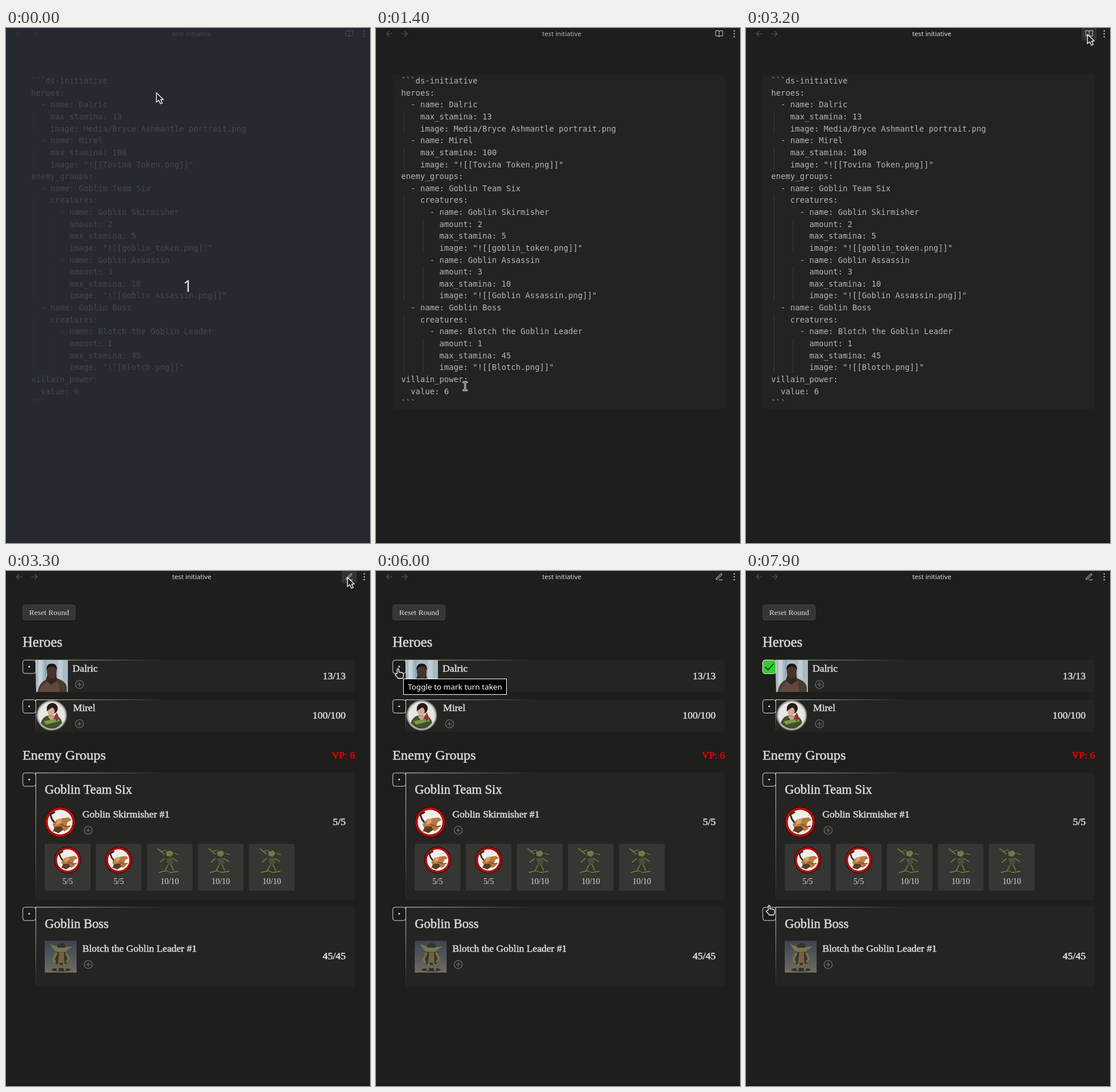
Animation, 629 px wide and 890 px high, one loop 8000 ms. Source, as an HTML page:

```html
<!DOCTYPE html>
<html lang="en">
<head>
<meta charset="utf-8">
<title>test initiative</title>
<style>
html, body { margin: 0; width: 100%; height: 100%; overflow: hidden; background: #1e1e1c; }
svg { display: block; width: 100vw; height: 100vh; }
text { white-space: pre; }
.ui { font-family: "Noto Sans", "Open Sans", sans-serif; }
.code { font: 13.71px "DejaVu Sans Mono", "Liberation Mono", monospace; fill: #b5b5b2; }
.serif { font-family: "Liberation Serif", "Noto Serif", serif; fill: #dadad6; }
.strong { stroke: #dadad6; stroke-width: .55px; }
.line { fill: none; stroke-linecap: round; stroke-linejoin: round; }
</style>
</head>
<body>
<svg id="stage" viewBox="0 0 629 890"></svg>
<script>
const LOOP = 8000, STEP = 100;
const PITCH = 20.63, CODE_TOP = 81;

const code = `\`\`\`ds-initiative
heroes:
  - name: Dalric
    max_stamina: 13
    image: Media/Bryce Ashmantle portrait.png
  - name: Mirel
    max_stamina: 100
    image: "![[Tovina Token.png]]"
enemy_groups:
  - name: Goblin Team Six
    creatures:
      - name: Goblin Skirmisher
        amount: 2
        max_stamina: 5
        image: "![[goblin_token.png]]"
      - name: Goblin Assassin
        amount: 3
        max_stamina: 10
        image: "![[Goblin Assassin.png]]"
  - name: Goblin Boss
    creatures:
      - name: Blotch the Goblin Leader
        amount: 1
        max_stamina: 45
        image: "![[Blotch.png]]"
villain_power:
  value: 6
\`\`\``.split("\n");

// Small drawing helpers
const group = (id, body, attrs = "") => `<g id="${id}" ${attrs}>${body}</g>`;
const rect = (x, y, w, h, fill, more = "") =>
  `<rect x="${x}" y="${y}" width="${w}" height="${h}" fill="${fill}" ${more}/>`;
const circle = (x, y, r, fill, more = "") =>
  `<circle cx="${x}" cy="${y}" r="${r}" fill="${fill}" ${more}/>`;
const shape = (d, fill) => `<path d="${d}" fill="${fill}"/>`;
const line = (d, color, width = 1) =>
  `<path class="line" d="${d}" stroke="${color}" stroke-width="${width}"/>`;
const at = (x, y, body, scale = 1) =>
  `<g transform="translate(${x} ${y}) scale(${scale})">${body}</g>`;
const label = (x, y, size, str, kind = "serif strong", more = "") =>
  `<text x="${x}" y="${y}" font-size="${size}" class="${kind}" ${more}>${str}</text>`;
const END = 'text-anchor="end"', MID = 'text-anchor="middle"';

// Editor view
function guide(x, from, to) {
  const y = i => CODE_TOP + i * PITCH;
  return rect(x, y(from) + 1, 1, y(to + 1) - y(from) - 2, "#3b3b39");
}

function editor() {
  const rows = code.map((row, i) =>
    `<text class="code" x="43.5" y="${(96.1 + i * PITCH).toFixed(1)}">${row}</text>`).join("");
  const guides = [[48, 3, 4], [48, 6, 7], [48, 10, 18], [81, 12, 14],
    [81, 16, 18], [48, 20, 24], [81, 22, 24]].map(g => guide(...g)).join("");
  return rect(28.5, 81, 574, 577.5, "#232322", 'rx="3"') + guides + rows +
    group("chevron", line("M-3.5 -2L0 2L3.5 -2", "#777774", 1.3));
}

// Portraits
const ranger = rect(0, 0, 55, 55, "#a8bbc2") +
  rect(4, 0, 7, 55, "#c4d3d8") + rect(38, 0, 8, 45, "#bccdd2") + rect(15, 0, 3, 40, "#93a8b0") +
  shape("M3 55Q5 38 19 33L34 31Q50 35 53 46V55Z", "#493a32") +
  shape("M6 55Q8 43 19 37L26 43L37 36L41 55Z", "#62493b") +
  shape("M20 24H35L36 35L26 42L17 35Z", "#33251f") +
  `<ellipse cx="27" cy="20" rx="8.5" ry="12" fill="#49332a"/>` +
  shape("M18 18Q17 6 27 6Q37 6 36 18Q33 11 27 11Q21 11 18 18Z", "#181513");

const lady = circle(0, 0, 26.5, "#71716f") + circle(0, 0, 25, "#b9b9b7") + circle(0, 0, 23, "#e8e7e3") +
  shape("M-19 13Q-15 1 -5 0L8 1Q16 3 18 13Q9 24 0 23Q-11 23 -19 13Z", "#3b5429") +
  shape("M-7 1L6 1L0 11Z", "#d0a089") + shape("M-14 10L12 5L14 10L-10 16Z", "#82974b") +
  circle(1, -12, 9.5, "#241c1b") +
  `<ellipse cx="-1" cy="-7" rx="6" ry="8" fill="#d8aa94"/>` +
  shape("M-9 -7Q-7 -22 6 -18L9 -8L1 -14Z", "#241c1b") + shape("M9 -5L13 5L8 11L5 1Z", "#9b3030");

const skirmisher = circle(0, 0, 27, "#4b0706") + circle(0, 0, 25.3, "#c40d0b") +
  circle(0, 0, 22.5, "#750504") + circle(0, 0, 21.5, "#f2efea") +
  line("M-14 -5L-17 -13L-10 -17M-14 -5L-8 3", "#30271f", 3) +
  shape("M-13 4L-5 -5L5 -7L15 -8L20 -4L13 0L11 6L15 11L7 16L4 11L-6 13L-14 18L-10 10Z", "#b77a42") +
  shape("M-5 -5L3 -6L2 1L-7 5Z", "#d9a465") +
  shape("M-9 8L2 7L6 13L-3 19L-12 15Z", "#5c3b24") +
  line("M2 4L12 8L17 7", "#8c562c", 2.5);

const assassin =
  shape("M1 4L10 8L14 2L21 5L27 1L30 7L37 8L29 13L31 19L26 25L30 31L27 38L36 42L29 46H4L9 40L15 38L11 30L15 24L9 19L14 14L8 12Z", "#343627") +
  shape("M14 8L23 6L27 11L22 17L15 15Z", "#6f7948") +
  shape("M14 20L25 18L27 28L18 32Z", "#54483f") +
  line("M0 3L11 12M11 20L4 26M26 20L34 25M17 32L13 40M23 31L27 40", "#68704a", 2) +
  line("M2 44L14 41L22 44L35 42M5 8L15 5M29 11L36 13", "#8a7b55", 1.3);

const leader = rect(0, 0, 55, 55, "url(#dusk)") +
  `<ellipse cx="28" cy="50" rx="17" ry="3" fill="#30302d"/>` +
  shape("M21 10L9 6L17 17L23 19H35L48 10L37 11Q29 3 21 10Z", "#74784b") +
  shape("M21 9Q29 -1 37 9L35 12H22Z", "#34342f") +
  shape("M20 20H37L40 38L33 42H22L17 38Z", "#3d3326") +
  shape("M25 20H33L34 38H23Z", "#776044") +
  line("M20 22L15 32L18 37M37 22L42 31L38 36", "#717545", 3.5) +
  line("M24 40L22 50M33 40L35 50", "#686b40", 4);

// Reader view
const toggle = y =>
  rect(29, y + .5, 22.5, 23, "#1b1b1a", 'rx="4" stroke="#d8d8d5"') + circle(40, y + 11.7, 1.5, "#dededb");
const card = (y, h) => rect(51.5, y, 551, h, "#242423", 'rx="2"') +
  rect(51, y, 220, 1, "url(#fadeX)") + rect(51, y, 1, h, "url(#fadeY)") + toggle(y);
const plus = (x, y) => circle(x, y, 7, "none", 'stroke="#777774" stroke-width="1.2"') +
  line(`M${x - 3.5} ${y}h7M${x} ${y - 3.5}v7`, "#777774", 1.2);
const score = (y, str) => label(587, y, 17.5, str, "serif strong", END);

function cell(i) {
  const x = 67 + i * 88.2, weak = i < 2;
  return rect(x.toFixed(1), 471.5, 79, 81, "#363633", 'rx="3"') +
    (weak ? at(x + 39.5, 499.5, skirmisher, .86) : at(x + 19, 477, assassin)) +
    label(x + 39.5, 541, 14, weak ? "5/5" : "10/10", "serif", MID);
}

function reader() {
  return rect(28.5, 59, 91.5, 28, "#151514", 'rx="4"') +
    rect(29, 58.5, 90.5, 26.5, "#363633", 'rx="3.5" stroke="#434340"') +
    label(74.5, 76, 13.4, "Reset Round", "serif", MID) +
    label(28.5, 131, 24.4, "Heroes") +
    card(153.5, 56) + at(52, 154, ranger) + label(115, 173.5, 17.4, "Dalric") +
    plus(127, 196) + score(186.5, "13/13") +
    card(222, 56) + at(79, 249.5, lady) + label(116, 242, 17.4, "Mirel") +
    plus(127, 264) + score(255, "100/100") +
    label(28.5, 326, 23.9, "Enemy Groups") +
    label(603, 324, 17.4, "VP: 6", "serif", END + ' style="fill:#e80000;stroke:#e80000;stroke-width:.6px"') +
    card(348.5, 219.5) + label(67, 385, 22.2, "Goblin Team Six") +
    at(93.5, 434, skirmisher) + label(132, 425.5, 17.4, "Goblin Skirmisher #1") +
    plus(142, 448) + score(438.5, "5/5") + [0, 1, 2, 3, 4].map(cell).join("") +
    card(580.5, 138) + label(67, 617, 22.2, "Goblin Boss") +
    at(67, 639, leader) + label(132, 657.5, 17.3, "Blotch the Goblin Leader #1") +
    plus(142, 680) + score(670.5, "45/45") +
    group("check", rect(29, 154, 22.5, 23.5, "#32cd32", 'rx="4" stroke="#e0e0dd"') +
      line("M33.5 166L38 171L47.5 160.5", "#102010", 1.6)) +
    group("tip", rect(47.5, 186.5, 178, 27, "#000", 'stroke="#fff"') +
      label(136.5, 205, 13.33, "Toggle to mark turn taken", "ui", MID + ' fill="#fff"'));
}

// Header
const arrowIcon = (x, s) =>
  line(`M${x - 5} 10H${x + 5}M${x + s} 5.5L${x + s * 5 / 4.5 * 1} 5.5`, "none") +
  line(`M${x - 5} 10h10M${x + s * .5} 5.5L${x + s * 5} 10L${x + s * .5} 14.5`, "#555553", 1.1);
const lucide = d => at(593, 10, `<g transform="translate(-12 -12)">${line(d, "#b3b3b0", 1.8)}</g>`, .6);

function header() {
  return group("hoverMode", rect(580, -2, 26, 23.5, "#333331", 'rx="4"')) +
    group("hoverMenu", rect(606, -2, 26, 23.5, "#333331", 'rx="4"')) +
    arrowIcon(23, -1) + arrowIcon(49, 1) +
    label(321, 14, 11.2, "test initiative", "ui", MID + ' id="heading"') +
    group("book", lucide("M2 3h6a4 4 0 0 1 4 4v14a3 3 0 0 0-3-3H2zM22 3h-6a4 4 0 0 0-4 4v14a3 3 0 0 1 3-3h7z")) +
    group("pencil", lucide("M12 21h9M16.5 3.5a2.1 2.1 0 0 1 3 3L7 19l-4 1 1-4z")) +
    [5, 10, 15].map(y => circle(619, y, 1.3, "#b3b3b0")).join("");
}

// Pointers, each with its hot spot at 0,0
const outlined = (d, outer, inner, w) => line(d, outer, w + 2) + line(d, inner, w);
const solid = d =>
  `<path d="${d}" fill="#20201f" stroke="#fff" stroke-width="1.3" stroke-linejoin="round"/>`;
const pointers = {
  arrow: solid("M0 0V16L4 12.7L7 19L10 17.6L7.3 11.6H12Z"),
  hand: solid("M-1.5 8V1.5a1.5 1.5 0 0 1 3 0V6q2-1 3 .5q2-.7 2.7.7q2-.3 2.3 1.5V12q0 2-1.5 4.5H0q-1.5-3-5-6q0-2.2 2-1.5z"),
  beam: outlined("M-3 -7H-1L0 -6L1 -7H3M0 -6V6M-3 7H-1L0 6L1 7H3", "#f2f2f2", "#222", 1),
  zoom: outlined("M6 0A6 6 0 1 1 -6 0A6 6 0 1 1 6 0M4.5 4.5L9.5 9.5M-3 0H3M0 -3V3", "#222", "#fff", 1.3)
};

document.getElementById("stage").innerHTML = `
  <defs>
    <linearGradient id="fadeX"><stop stop-color="#e4e4e0"/><stop offset="1" stop-color="#e4e4e0" stop-opacity="0"/></linearGradient>
    <linearGradient id="fadeY" x2="0" y2="1"><stop stop-color="#e4e4e0"/><stop offset="1" stop-color="#e4e4e0" stop-opacity="0"/></linearGradient>
    <linearGradient id="dusk" x2="0" y2="1"><stop stop-color="#3d444f"/><stop offset=".65" stop-color="#5b5d60"/><stop offset="1" stop-color="#766c5d"/></linearGradient>
  </defs>` +
  rect(0, 0, 629, 890, "#1e1e1c") + header() +
  group("editor", editor()) + group("reader", reader()) + rect(0, 888, 629, 2, "#181817") +
  group("countdown", rect(0, 0, 629, 890, "#272c34", 'opacity=".8"') +
    label(314, 456, 28, "1", "ui", MID + ' fill="#e4e4e4"')) +
  Object.entries(pointers).map(([name, body]) => group(name, body)).join("");

const $ = id => document.getElementById(id);
const show = (id, on) => { $(id).style.display = on ? "" : "none"; };
const place = (id, x, y) => $(id).setAttribute("transform", `translate(${x.toFixed(1)} ${y.toFixed(1)})`);

// Pointer path: time, x, y
const path = [
  [0, 260, 112], [800, 260, 112], [1400, 154, 619], [1900, 154, 619],
  [2600, 616, 13], [2800, 590, 11], [4400, 590, 11], [5000, 77, 171.5],
  [5300, 41, 182], [5500, 38, 169], [7400, 38, 169], [7900, 40, 578], [LOOP, 40, 578]
];
const ease = p => p * p * (3 - 2 * p);

function pointerAt(t) {
  const i = path.findIndex(p => p[0] > t) - 1;
  const [t0, x0, y0] = path[i], [t1, x1, y1] = path[i + 1];
  const p = ease((t - t0) / (t1 - t0));
  return [x0 + (x1 - x0) * p, y0 + (y1 - y0) * p];
}

const toggles = [154, 222, 349, 580];
const within = (v, a, b) => v >= a && v <= b;

function pointerKind(x, y, reading, counting) {
  if (counting || y < 22) return "arrow";
  if (!reading) return "beam";
  if (within(x, 29, 51) && toggles.some(top => within(y, top - 4, top + 25))) return "hand";
  if (within(x, 52, 107) && within(y, 154, 210)) return "zoom";
  return "arrow";
}

function draw(time) {
  const t = Math.floor(time / STEP) * STEP;
  const counting = t < 100, reading = t >= 3300;
  const [x, y] = pointerAt(t);
  const kind = pointerKind(x, y, reading, counting);

  for (const name in pointers) show(name, name === kind);
  place(kind, x, y);

  const row = Math.floor((y - CODE_TOP) / PITCH);
  const foldable = !counting && !reading && /^\w+:$/.test(code[row] || "");
  show("chevron", foldable);
  if (foldable) place("chevron", 34, CODE_TOP + (row + .5) * PITCH + 1);

  show("countdown", counting);
  show("editor", !reading);
  show("reader", reading);
  show("book", !reading);
  show("pencil", reading);
  show("hoverMode", y < 22 && within(x, 580, 606));
  show("hoverMenu", y < 22 && x > 606);
  show("tip", within(t, 6000, 7099));
  show("check", t >= 7200);
  $("heading").setAttribute("fill", t >= 3200 ? "#dadad7" : "#b3b3b0");
}

const start = performance.now();
function tick() {
  draw((performance.now() - start) % LOOP);
  requestAnimationFrame(tick);
}
tick();
</script>
</body>
</html>
```
